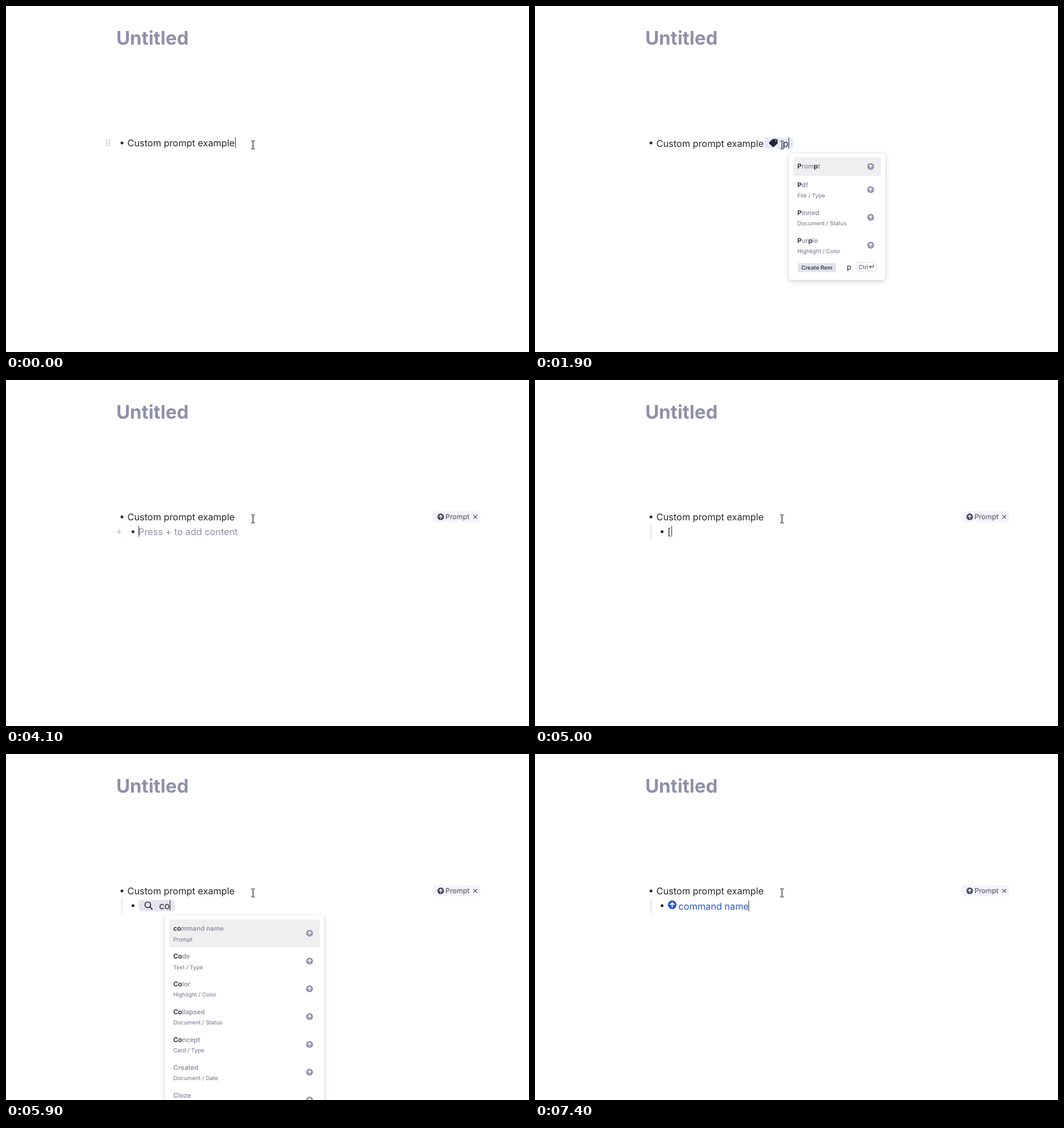
Write an HTML page that moves like this. It is 920x609 px and loops after 8000 ms.

```html
<!DOCTYPE html>
<html lang="en">
<head>
<meta charset="utf-8">
<title>Custom prompt example</title>
<style>
html, body { margin: 0; width: 100%; height: 100%; overflow: hidden; background: #fff; }
svg { display: block; width: 920px; height: 609px; }
text { font-family: Inter, sans-serif; font-optical-sizing: none; white-space: pre; text-rendering: geometricPrecision; }
.pop { fill: #fff; filter: drop-shadow(0 3px 5px rgba(0,0,0,.15)) drop-shadow(0 0 1px rgba(0,0,0,.12)); }
.line { fill: none; stroke-linecap: round; stroke-linejoin: round; }
</style>
</head>
<body>
<svg id="stage" viewBox="0 0 920 609"></svg>
<script>
const LOOP = 8000, TICK = 100;
const BODY = 16.32, SMALL = 12.98, TINY = 9.9;
const INK = '#26262f', MUTED = '#9090aa', DIM = '#6e6e88';
const stage = document.getElementById('stage');

const text = (x, y, s, size = BODY, fill = INK, weight = 400) =>
  `<text x="${x}" y="${y}" font-size="${size}" fill="${fill}" font-weight="${weight}">${s}</text>`;
const box = (x, y, w, h, r, fill, more = '') =>
  `<rect x="${x}" y="${y}" width="${w}" height="${h}" rx="${r}" fill="${fill}" ${more}/>`;
const dot = (x, y, r, fill) => `<circle cx="${x}" cy="${y}" r="${r}" fill="${fill}"/>`;
const line = (d, stroke, w) => `<path class="line" d="${d}" stroke="${stroke}" stroke-width="${w}"/>`;
const caret = (x, y) => box(x, y, 1, 19, 0, INK);
const bullet = (x, y) => dot(x, y, 2.5, INK);

const upIcon = (x, y, r, fill) => dot(x, y, r, fill) +
  `<g transform="translate(${x} ${y}) scale(${r / 6})">${line('M0 3V-2.8M-2.6 -.3L0 -2.9L2.6 -.3', '#fff', 1.5)}</g>`;

const plus = (x, y) => line(`M${x - 4.5} ${y}h9M${x} ${y - 4.5}v9`, '#c4c4d4', 1.3);

function handle() {
  let out = '';
  for (const x of [177.7, 182.2]) for (const y of [236.6, 241, 245.4]) out += dot(x, y, 1.4, '#c6c6d8');
  return out;
}

function pointer() {
  const d = 'M432 237.5h1.5l1 1l1 -1h1.5M434.5 238.5v12M432 251.5h1.5l1 -1l1 1h1.5';
  return line(d, '#cfcfcf', 2.6) + line(d, '#222', 1);
}

const tagIcon = () =>
  '<path d="M419 234.2h5.4q2.4 0 2.4 2.2v4.2q0 1-.8 1.8l-5.4 5q-1.4 1.2-2.8 0l-5.6-5q-1.2-1.4 0-2.7l5-4.7q.8-.8 1.8-.8z" fill="#26262f"/>' +
  dot(423.6, 237.3, 1, '#e6e9fc');

const searchIcon = () => '<circle cx="249.4" cy="265.4" r="4.9" fill="none" stroke="#26262f" stroke-width="1.7"/>' +
  line('M253 269L257 273', INK, 1.8);

const promptTag = x => box(x, 231, 83.5, 19.5, 5, '#f3f3fa') + upIcon(x + 14.2, 240.8, 5.8, '#45455a') +
  text(x + 22.5, 245.3, 'Prompt', 12.4, '#4c4c60') +
  line(`M${x + 72} 237.8l6 6m0 -6l-6 6`, '#4c4c60', 1.2);

const hint = (x, y) => box(x, y, 153.5, 31, 4, '#fff', 'class="pop"') +
  text(x + 7.5, y + 20.2, 'Start typing to search.', SMALL, '#c3c3d3');

const mark = (name, query) =>
  name.replace(new RegExp(query, 'gi'), m => `<tspan fill="#1e1e28">${m}</tspan>`);

function results(left, top, right, items, query, queryX, note) {
  let rows = '', y = top + 7.3;
  items.forEach(([name, sub], i) => {
    const h = sub ? 48.9 : 32.6;
    if (!i) rows += box(left + 8, y, right - left - 16, h, 3.5, '#efefef');
    rows += text(left + 15.2, y + 19.8, mark(name, query), 11.5, MUTED, 600);
    if (sub) rows += text(left + 15.3, y + 38.3, sub, TINY, DIM);
    rows += upIcon(right - 26, y + h / 2 - .2, 6, MUTED);
    y += h;
  });
  const key = right - 50.5;
  rows += box(left + 16, y + 6.8, 67.5, 16.2, 3, '#e3e3ed') +
    text(left + 22.2, y + 18.6, 'Create Rem', 9.75, '#3d3d4d', 600) +
    text(queryX, y + 18.1, query, SMALL) +
    box(key, y + 6, 34, 15, 3, '#fff', 'stroke="#dadae6"') +
    text(key + 3.2, y + 17, 'Ctrl', TINY, '#45455a') +
    line(`M${key + 29.5} ${y + 10.5}v3h-7m2 -2l-2 2l2 2`, '#45455a', 1.1);
  if (note) rows += text(left + 7, y + 41.2, note, SMALL);
  return box(left, top, right - left, y + (note ? 52 : 36.7) - top, 5, '#fff', 'class="pop"') + rows;
}

const P_ITEMS = [['Prompt'], ['Pdf', 'File / Type'], ['Pinned', 'Document / Status'], ['Purple', 'Highlight / Color']];
const C_ITEMS = [['command name', 'Prompt'], ['Code', 'Text / Type'], ['Color', 'Highlight / Color'],
  ['Collapsed', 'Document / Status'], ['Concept', 'Card / Type'], ['Created', 'Document / Date'], ['Cloze', 'Card / Type']];
const COMMAND = [C_ITEMS[0]];
const NOTE = 'Missing result (should only happen on Dev)';

// Latest [time, ...values] entry that has started.
const at = (t, steps) => steps.filter(s => s[0] <= t).pop().slice(1);

function tagSearch(t) {
  const [query, end] = at(t, [[700, '', 435], [1900, 'p', 446], [2100, 'pr', 452], [2200, 'pro', 462]]);
  const shown = !(t >= 1300 && t < 1900) && t < 2800;
  let out = box(403, 231.5, (query ? end + 8 : 584) - 403, 19.5, 4, '#e6e9fc') + tagIcon() +
    (query ? text(435.7, 248, query) : text(435.7, 248, 'Type to add a Tag', BODY, DIM));
  if (shown) out += caret(end, 231.5);
  if (!query) return out + hint(436, 258.5);
  const [items, right, x] = at(t, [[1900, P_ITEMS, 616.5, 548.6], [2100, [['Prompt']], 617, 547], [2200, [['Prompt']], 620.7, 545]]);
  return out + results(446.3, 259, right, items, query, x);
}

function referenceSearch(t) {
  const [query, end] = at(t, [[5100, '', 269], [5800, 'c', 279], [5900, 'co', 288], [6000, 'com', 302], [6300, 'comm', 316]]);
  const shown = !(t >= 5700 && t < 5800) && t < 6900;
  let out = box(233.5, 257, (query ? end + 9 : 486) - 233.5, 19.5, 5, '#e4e4ed') + searchIcon() +
    (query ? text(269.2, 273, query) : text(269.5, 273, 'Type to create a Reference', BODY, DIM));
  if (shown) out += caret(end, 257);
  if (!query) return t < 5200 ? out : out + hint(270, 283.6);
  const done = t >= 6100;
  return out + results(279, 284, 560, done ? COMMAND : C_ITEMS, query, 378.4, done && NOTE);
}

function secondRow(t) {
  const x = t < 4000 ? 214 : 233.5;
  let out = bullet(x - 10, 267);
  if (t >= 4000) out += box(203.4, 254, 1.3, t < 7400 ? 26 : 27, 0, '#d6d6e6');
  if (t < 5000) {
    out += box(x - 40, 255, 14, 24, 0, '#fff') + plus(x - 34.5, 267) +
      text(x - .5, 273, 'Press + to add content', BODY, MUTED);
    return t < 4600 ? out + caret(Math.floor(x), 257) : out;
  }
  if (t < 5100) return out + text(x - .5, 273, '[') + caret(240, 257);
  if (t < 7400) return out + referenceSearch(t);
  return out + upIcon(241.4, 265.4, 7.6, '#2055d8') +
    text(252.3, 274, 'command name', BODY, '#2055d8') + caret(375.5, 258);
}

function scene(t) {
  const tagging = t >= 700 && t < 2900;
  let out = text(193.9, 68, 'Untitled', 33, MUTED, 700) + bullet(204, 241) +
    text(213.5, tagging ? 248 : 247, 'Custom prompt example');
  if (t < 100) out += handle();
  if (t < 500 || t >= 2900 && t < 3500) out += caret(403, 231.5);
  else if (t < 700) out += text(403, 247, '#') + caret(412, 231.5);
  if (tagging) out += tagSearch(t);
  if (t >= 2900) out += promptTag(t < 4100 ? 758.7 : 750.5);
  if (t >= 3800) out += secondRow(t);
  return out + pointer();
}

const start = performance.now();
let last = -1;
function frame() {
  const t = Math.floor((performance.now() - start) % LOOP / TICK) * TICK;
  if (t !== last) stage.innerHTML = scene(last = t);
  requestAnimationFrame(frame);
}
frame();
</script>
</body>
</html>
```
